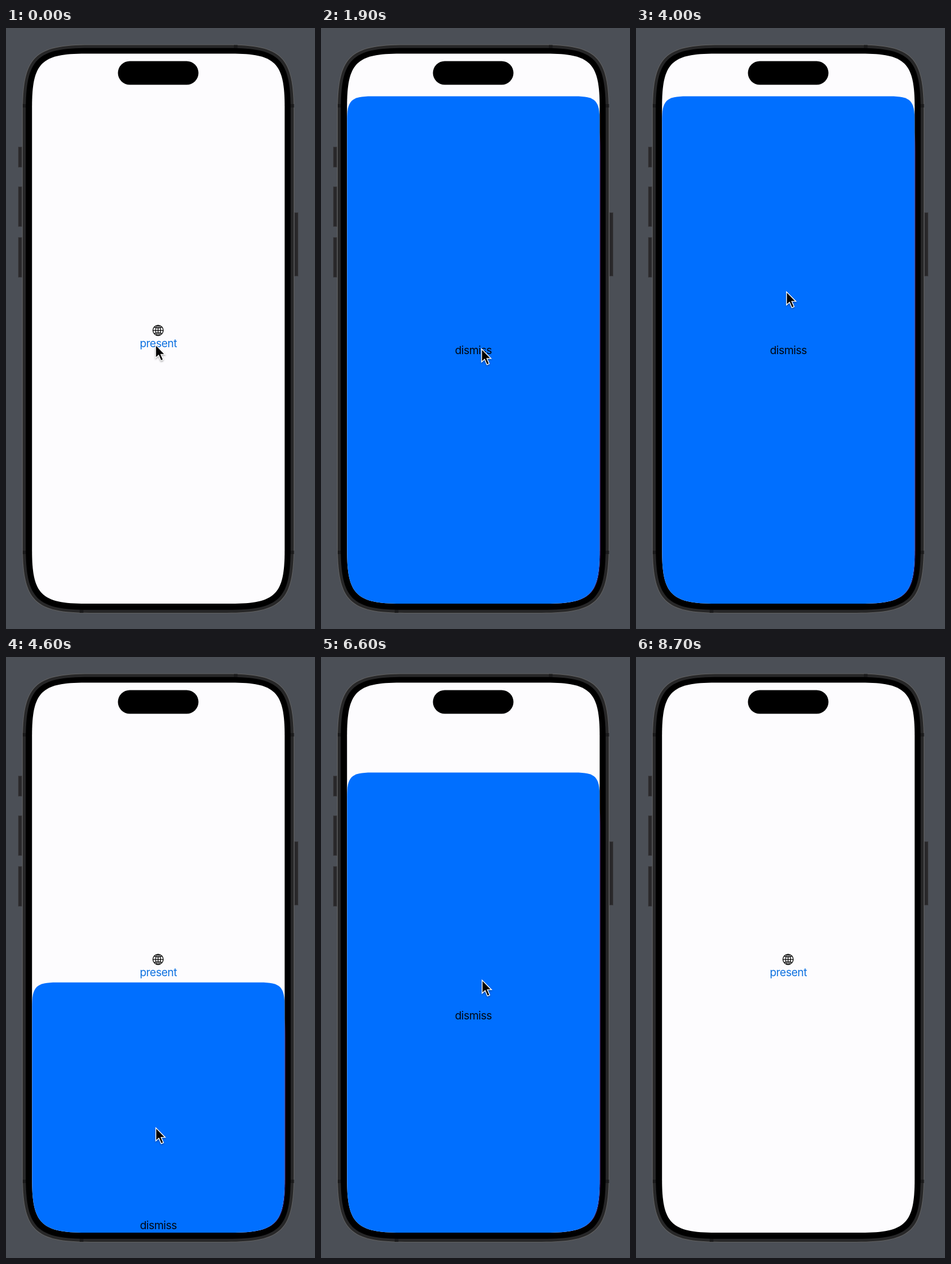
An HTML page with a canvas for the animation above (9000 ms loop, 537 by 1043 pixels).

```html
<!DOCTYPE html>
<html lang="en">
<head>
<meta charset="utf-8">
<title>Sheet presentation</title>
<style>
  html, body { margin: 0; width: 100%; height: 100%; overflow: hidden; background: #4b4f56; }
  canvas { display: block; }
</style>
</head>
<body>
<canvas id="stage" width="537" height="1043"></canvas>
<script>
const ctx = document.getElementById('stage').getContext('2d');
const LOOP = 9000, STEP = 100, SPRING = 18, TRAVEL = 400, LEAVE = 8200;
const LEFT = 45.2, TOP = 44.5, RIGHT = 484.3, BOTTOM = 999;
const REST = 118.5, HIDDEN = BOTTOM;

// Taps and drags: the cursor height, and where the sheet springs afterwards
const tap = (at, y, to) => ({ at, end: at, y, endY: y, to });
const drag = (at, ms, y, endY, to) => ({ at, end: at + ms, y, endY, to });
const actions = [
  tap(40, 549, REST),
  drag(1050, 400, 385, 590, REST),
  tap(1910, 556, HIDDEN),
  tap(3310, 544, REST),
  drag(4200, 650, 370, 1036, HIDDEN),
  tap(5210, 546, REST),
  drag(6200, 300, 383, 560, REST),
  drag(7150, 638, 383, 1011, HIDDEN)
];

const mix = (a, b, u) => a + (b - a) * u;
const ease = (t, from, to) => {
  const u = Math.min(1, Math.max(0, (t - from) / (to - from || 1)));
  return u * u * (3 - 2 * u);
};

// The hand sways sideways and moves to each action just before it starts
function cursorAt(t) {
  let y = actions[0].y, free = 0;
  for (const a of actions) {
    y = mix(y, a.y, ease(t, Math.max(free, a.at - TRAVEL), a.at));
    if (t < a.at) break;
    y = mix(a.y, a.endY, ease(t, a.at, a.end));
    free = a.end;
  }
  return { x: 270 - 10 * Math.cos(t / 700), y };
}

function sheetTop(t) {
  let top = HIDDEN;
  actions.forEach((a, i) => {
    if (t < a.at) return;
    top += mix(a.y, a.endY, ease(t, a.at, a.end)) - a.y;
    if (t < a.end) return;
    const until = Math.min(t, actions[i + 1] ? actions[i + 1].at : LOOP);
    const wt = SPRING * (until - a.end) / 1000;
    const rest = (top - a.to) * (1 + wt) * Math.exp(-wt);
    top = a.to + (Math.abs(rest) < 1 ? 0 : rest);
  });
  return top;
}

// Rectangle with continuous-curvature corners
function squircle(l, t, r, b, radius, color) {
  const e = radius * 1.528, c = e * 0.17;
  ctx.beginPath();
  ctx.moveTo(l + e, t);
  ctx.lineTo(r - e, t);
  ctx.bezierCurveTo(r - c, t, r, t + c, r, t + e);
  ctx.lineTo(r, b - e);
  ctx.bezierCurveTo(r, b - c, r - c, b, r - e, b);
  ctx.lineTo(l + e, b);
  ctx.bezierCurveTo(l + c, b, l, b - c, l, b - e);
  ctx.lineTo(l, t + e);
  ctx.bezierCurveTo(l, t + c, l + c, t, l + e, t);
  ctx.closePath();
  ctx.fillStyle = color;
  ctx.fill();
}

function rect(x, y, w, h, color) {
  ctx.fillStyle = color;
  ctx.fillRect(x, y, w, h);
}

function button(x, y, h) {
  rect(x, y, 7, h, '#3a3a3d');
  rect(x + 1, y + 1, 5, h - 2, '#29282a');
}

const shell = (inset, color) =>
  squircle(28 + inset, 28.5 + inset, 501 - inset, 1016 - inset, 78 - inset, color);

const antenna = (x, y) => rect(x, y, 6.5, 6, '#1b1b1c');

function phone() {
  rect(0, 0, 537, 1043, '#4b4f56');
  button(21, 206, 36);
  button(21, 275, 70);
  button(21, 363, 70);
  button(501, 320, 111);
  shell(0, '#626262');
  shell(1, '#272728');
  for (const x of [29, 494]) {
    antenna(x, 132);
    antenna(x, 907);
  }
  antenna(396, 29.5);
  antenna(128, 1009);
  shell(6.3, '#000');
}

function label(text, y, color) {
  ctx.font = '19px Inter, sans-serif';
  ctx.letterSpacing = '-0.5px';
  ctx.textAlign = 'center';
  ctx.fillStyle = color;
  ctx.fillText(text, 264.7, y);
}

function globe(x, y, r) {
  ctx.save();
  ctx.translate(x, y);
  ctx.strokeStyle = '#000';
  ctx.lineWidth = 1.3;
  ctx.beginPath();
  for (const w of [r, r * 0.47]) {
    ctx.moveTo(w, 0);
    ctx.ellipse(0, 0, w, r, 0, 0, 7);
  }
  ctx.moveTo(0, -r);
  ctx.lineTo(0, r);
  for (const s of [-1, 0, 1]) {
    const w = r * (1 - 0.22 * s * s);
    ctx.moveTo(-w, s * r * 0.62);
    ctx.quadraticCurveTo(0, s * r * 0.3, w, s * r * 0.62);
  }
  ctx.stroke();
  ctx.restore();
}

const pointer = new Path2D('M.7 2.6V22L5.5 17.7 9.7 27.4 12.3 26.3 8.1 16.7H14.6Z');

function arrow({ x, y }) {
  ctx.save();
  ctx.translate(x, y);
  ctx.shadowColor = 'rgba(0,0,0,.35)';
  ctx.shadowBlur = 3;
  ctx.shadowOffsetY = 1.5;
  ctx.strokeStyle = '#fff';
  ctx.lineWidth = 2.8;
  ctx.stroke(pointer);
  ctx.shadowColor = 'transparent';
  ctx.fillStyle = '#000';
  ctx.fill(pointer);
  ctx.restore();
}

function draw(t) {
  const top = sheetTop(t), open = top < HIDDEN;
  phone();

  // The sheet leaves a faint glow on the right bezel
  if (open) squircle(LEFT + 60, top + 6, RIGHT + 1.7, BOTTOM, Math.min(61, (BOTTOM - top) / 4), '#1a0a4a');

  ctx.save();
  squircle(LEFT, TOP, RIGHT, BOTTOM, 61, '#fdfcfe');
  ctx.clip();
  globe(264.3, 524.8, 9);
  label('present', 553.7, '#0f72e0');
  if (open) {
    squircle(LEFT, top, RIGHT, BOTTOM + 90, 28, '#006fff');
    // The safe area lifts the label once the sheet leaves its resting place
    label('dismiss', top + 447.8 - Math.min(top - REST, 39) / 2, '#000814');
  }
  ctx.restore();

  ctx.fillStyle = '#000';
  ctx.beginPath();
  ctx.roundRect(194.5, 57.5, 140, 41, 20.5);
  ctx.fill();
  if (t < LEAVE) arrow(cursorAt(t));
}

const start = performance.now();
function tick() {
  const t = (performance.now() - start) % LOOP;
  draw(Math.floor(t / STEP) * STEP);
  requestAnimationFrame(tick);
}
tick();
</script>
</body>
</html>
```
